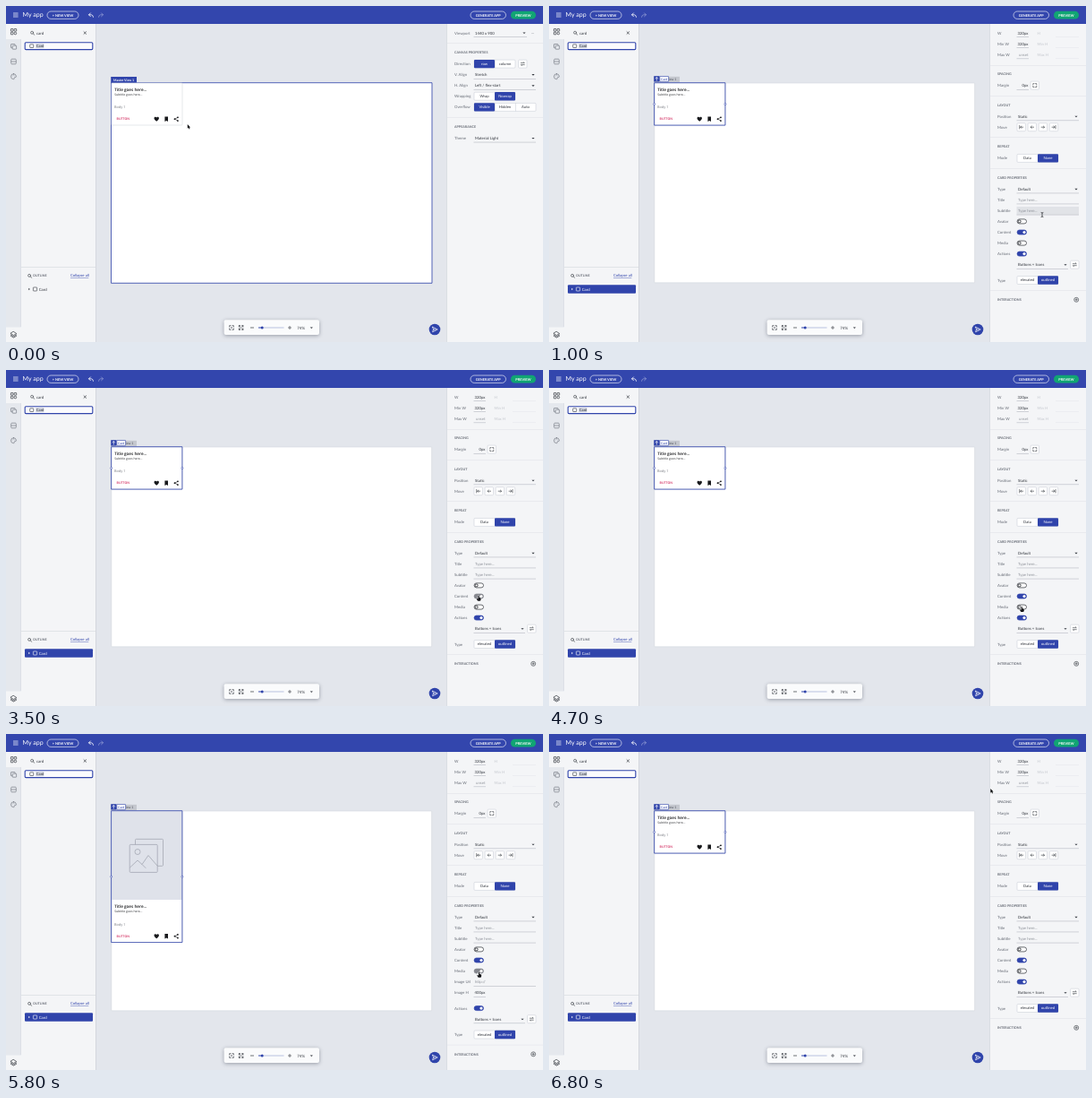
An HTML page with a canvas for the animation above (7 s loop, 600 by 375 pixels).

```html
<!DOCTYPE html>
<html lang="en">
<head>
<meta charset="utf-8">
<title>App builder</title>
<style>
html, body { margin: 0; width: 100%; height: 100%; overflow: hidden; background: #e3e6ec; }
canvas { display: block; width: 600px; height: 375px; }
</style>
</head>
<body>
<canvas id="stage"></canvas>
<script>
const LOOP = 7000, STEP = 100;
const BLUE = '#3044ab', HEAD = '#3346ad', INK = '#30343c', GREY = '#666b75', LINE = '#a9adb6', RULE = '#dcdfe5', PANEL = '#f4f5f7';
const UI = 'Lato, "Open Sans", sans-serif', CARD = '"Open Sans", "Noto Sans", sans-serif';
const cv = document.getElementById('stage'), c = cv.getContext('2d');
const dpr = window.devicePixelRatio || 1;
cv.width = 600 * dpr;
cv.height = 375 * dpr;

function text(s, x, y, size = 4.3, color = INK, weight = 400, align = 'left', font = UI) {
  c.font = `${weight} ${size}px ${font}`;
  c.fillStyle = color;
  c.textAlign = align;
  c.fillText(s, x, y + size * 0.35);
}
function rect(x, y, w, h, color) {
  c.fillStyle = color;
  c.fillRect(x, y, w, h);
}
function box(x, y, w, h, r, fill, stroke, lw = 0.5) {
  c.beginPath();
  c.roundRect(x, y, w, h, r);
  paint(fill, stroke, lw);
}
function disc(x, y, r, fill, stroke, lw = 0.5) {
  c.beginPath();
  c.arc(x, y, r, 0, 7);
  paint(fill, stroke, lw);
}
function paint(fill, stroke, lw) {
  if (fill) { c.fillStyle = fill; c.fill(); }
  if (stroke) { c.strokeStyle = stroke; c.lineWidth = lw; c.stroke(); }
}
// SVG path placed with its own origin at x, y
function icon(d, x, y, fill, stroke, lw = 0.6) {
  const p = new Path2D(d);
  c.save();
  c.translate(x, y);
  c.lineJoin = c.lineCap = 'round';
  if (stroke) { c.strokeStyle = stroke; c.lineWidth = lw; c.stroke(p); }
  if (fill) { c.fillStyle = fill; c.fill(p); }
  c.restore();
}
const caret = (x, y) => icon('M-1.6-.7H1.6L0 .9Z', x, y, INK);
const plus = (x, y, r, color) => icon(`M${-r} 0H${r}M0 ${-r}V${r}`, x, y, null, color);
const rule = y => rect(493, y, 107, 0.5, RULE);
const heading = (s, y) => text(s, 501, y, 3.7, GREY, 700);
const label = (s, y) => text(s, 501, y, 4.3, GREY);
const glass = (x, y) => icon('M1 0A1.5 1.5 0 1 1-2 0A1.5 1.5 0 1 1 1 0M.6 1.1L2.2 2.5', x, y, null, INK);

function field(s, y, x1 = 592, color = INK) {
  text(s, 524, y, 4.3, color);
  rect(522.5, y + 4.4, x1 - 522.5, 0.5, LINE);
}
function select(name, s, y, x1 = 592) {
  if (name) label(name, y);
  field(s, y, x1);
  caret(x1 - 3, y + 0.2);
}
function number(name, s, y, color = INK) {
  label(name, y);
  text(s, 535.5, y, 4.3, color, 400, 'right');
  rect(522.5, y + 4.4, 13.5, 0.5, LINE);
}
function segments(name, items, on, y) {
  label(name, y);
  box(523, y - 4.5, 23 * items.length, 9, 1, '#fff', '#c3c7d0');
  items.forEach((s, i) => {
    const x = 523 + 23 * i;
    if (i === on) box(x, y - 4.7, 23, 9.4, 1, BLUE);
    else if (i) rect(x, y - 4.5, 0.5, 9, '#c3c7d0');
    text(s, x + 11.5, y, 4.2, i === on ? '#fff' : INK, 400, 'center');
  });
}
function square(x, y) { box(x - 4.7, y - 4.5, 9.4, 9, 1, '#fff', '#c3c7d0'); }
function swap(x, y) {
  square(x, y);
  icon('M-2-1H2L1-2M2 1H-2L-1 2', x, y, null, INK);
}
function toggle(name, y, state) {
  label(name, y);
  const on = state !== 'off', fill = { on: BLUE, hover: '#5059d2', wait: '#85878e', off: '#fff' }[state];
  box(523.1, y - 2.5, 10.4, 5, 2.5, fill, on ? fill : '#2d3036', 0.7);
  if (on) disc(531, y, 1.6, '#fff');
  else disc(525.7, y, 1.5, '#fff', '#2d3036', 0.9);
}

function header() {
  rect(0, 0, 600, 20, HEAD);
  icon('M-2.4-2H2.4M-2.4 0H2.4M-2.4 2H2.4', 10.8, 10, null, '#fff', 0.7);
  text('My app', 18.6, 10, 7, '#fff');
  box(46, 6, 35, 8.4, 4.2, null, '#fff', 0.6);
  text('+ NEW VIEW', 63.5, 10.2, 3.9, '#fff', 700, 'center');
  const undo = 'M-.6-2.4L-2.5-.5L-.6 1.4M-2.4-.5H.4Q2.2-.3 2.5 2';
  icon(undo, 95, 10.3, null, '#fff', 0.8);
  c.save();
  c.translate(106, 10.3);
  c.scale(-1, 1);
  icon(undo, 0, 0, null, '#8d99d3', 0.8);
  c.restore();
  box(519, 6, 39.5, 8.4, 4.2, null, '#fff', 0.6);
  text('GENERATE APP', 538.7, 10.2, 3.9, '#fff', 700, 'center');
  box(564, 5.8, 28, 8.8, 4.4, '#11a573');
  text('PREVIEW', 578, 10.2, 3.9, '#fff', 700, 'center');
}

function leftSide(picked) {
  rect(0, 20, 17, 355, '#e5e8ed');
  rect(0, 20, 17, 17, PANEL);
  rect(0, 358.5, 17, 16.5, PANEL);
  rect(17, 20, 83, 355, PANEL);
  rect(16.5, 37, 0.5, 321, '#d3d7de');
  rect(100, 20, 0.6, 355, '#cfd3db');
  for (const [x, y] of [[5.4, 25.5], [9.1, 25.5], [5.4, 29.2]]) box(x, y, 2.6, 2.6, 0.3, null, INK, 0.7);
  disc(10.4, 30.5, 1.3, null, INK, 0.7);
  box(5.5, 42.5, 4.6, 4.2, 0.5, null, GREY, 0.6);
  box(7.2, 44.2, 4.4, 4, 0.5, '#e5e8ed', GREY, 0.6);
  box(5.7, 59.2, 5.6, 5.6, 1, null, GREY, 0.6);
  rect(5.7, 61.7, 5.6, 0.6, GREY);
  icon('M0-3A3 3 0 1 0 0 3Q1 3 .6 1.9Q.4 1 1.6 1Q3 1 3-.3Q2.6-3 0-3Z', 8.5, 78.7, null, GREY);
  for (const [x, y] of [[7, 78], [8.4, 77], [10, 78]]) disc(x, y, 0.4, GREY);
  icon('M0-3L3.2-1L0 1L-3.2-1ZM-3.2 .4L0 2.3L3.2 .4M-3.2 1.7L0 3.6L3.2 1.7', 8.5, 366.5, null, INK, 0.7);

  glass(29.6, 29.7);
  text('card', 34, 30, 4.3);
  icon('M-1.3-1.3L1.3 1.3M1.3-1.3L-1.3 1.3', 88.3, 30, null, INK, 0.7);
  box(21.2, 40.8, 75.6, 7.8, 1, '#fbfbfd', BLUE, 1.1);
  box(26.7, 42.8, 4, 3.7, 0.5, null, INK, 0.6);
  rect(33.3, 42.2, 9, 5, '#cfd2dc');
  text('Card', 33.8, 44.8, 4.2);

  rect(17, 291.3, 83, 0.6, '#d3d7de');
  glass(26.6, 300.8);
  text('OUTLINE', 30, 301.2, 3.6, GREY, 700);
  text('Collapse all', 72, 301, 4.2, BLUE);
  rect(72, 303.2, 20.3, 0.4, BLUE);
  const ink = picked ? '#fff' : INK;
  if (picked) box(21, 311.3, 76, 9.4, 1, BLUE);
  icon('M-.7-1.3L.8 0L-.7 1.3Z', 26, 316, ink);
  box(30.4, 314, 4.2, 4, 0.5, null, ink, 0.6);
  text('Card', 36.7, 316.2, 4.3, ink);
}

function media() {
  rect(118, 86, 79, 99, '#dfe2ea');
  c.lineJoin = 'round';
  const stroke = '#a4a8b3';
  box(144.5, 117.3, 31, 30, 1, null, stroke, 0.8);
  box(138.2, 123.4, 31, 31, 1, '#dfe2ea', stroke, 0.8);
  disc(147, 131.5, 3, null, stroke, 0.8);
  icon('M138.5 149L147 141L152 145.5L159 135.5L169 147M152 145.5L156 149.5', 0, 0, null, stroke, 0.8);
}

function card(s) {
  const dy = s.media ? 99.5 : 0, up = s.content ? 0 : -14, h = 47 + dy + up;
  box(118, 86, 79, h, 0.8, '#fff', '#d5d8de', 0.6);
  if (s.media) media();
  const x = s.avatar ? 135.2 : 121.2;
  if (s.avatar) {
    disc(126.4, 94.6 + dy, 5, '#bfc2c8');
    disc(126.4, 93.1 + dy, 1.5, '#454951');
    icon('M-2.8 2.8Q-2.7 .5 0 .5Q2.7 .5 2.8 2.8Z', 126.4, 94.8 + dy, '#454951');
  }
  text('Title goes here...', x, 92.9 + dy, 4.6, '#17181b', 600, 'left', CARD);
  text('Subtitle goes here...', x, 98.7 + dy, 3.4, '#25272b', 400, 'left', CARD);
  if (s.content) text('Body 1', 121, 112.7 + dy, 3.9, '#777a80', 400, 'left', CARD);
  const y = 126.2 + dy + up;
  text('BUTTON', 123.6, y, 3.5, '#d0245a', 600, 'left', CARD);
  icon('M0 2.5C-2 .9-2.7 0-2.7-1C-2.7-2.6-.8-3 0-1.6C.8-3 2.7-2.6 2.7-1C2.7 0 2 .9 0 2.5Z', 168.2, y, '#18191c');
  icon('M-1.8-2.6H1.8V2.7L0 1.8L-1.8 2.7Z', 179.2, y, '#18191c');
  icon('M1.7-1.8L-1.7 0L1.7 1.8', 190.2, y, null, '#18191c', 0.6);
  for (const [a, b] of [[1.7, -1.9], [-1.7, 0], [1.7, 1.9]]) disc(190.2 + a, y + b, 0.9, '#18191c');
  if (s.picked) {
    box(117.6, 85.7, 79.3, h + 0.4, 0, null, BLUE, 0.8);
    for (const hx of [117.6, 196.9]) disc(hx, 86 + h / 2, 1, '#fff', BLUE, 0.6);
  } else if (s.over) box(117.8, 86, 79.2, h, 0, null, BLUE, 0.6);
}

function board(s) {
  rect(100.6, 20, 392, 355, '#e3e6ec');
  rect(117.8, 86, 357.8, 222.8, '#fff');
  if (!s.picked) {
    box(117.5, 85.7, 358.5, 223.6, 0, null, BLUE, 0.8);
    rect(117.2, 79, 28.8, 6.8, BLUE);
    text('Master View 1', 131.6, 82.4, 3.6, '#fff', 700, 'center');
  } else {
    box(117.8, 86, 357.8, 222.8, 0, null, '#cfd3da', 0.5);
    rect(117.4, 78.8, 28.6, 6.5, '#c4c7ce');
    text('Master View 1', 131, 82.1, 3.6, '#50545d', 400, 'center');
  }
  card(s);
  if (s.picked) {
    rect(117.2, 78.2, 6.3, 6.3, BLUE);
    icon('M0 1.8V-1.6M-1.3-.4L0-1.7L1.3-.4', 120.3, 81.3, null, '#fff', 0.7);
    box(123.8, 78.5, 9.8, 5.8, 0.4, '#fff', BLUE, 0.6);
    text('Card', 128.7, 81.4, 3.5, BLUE, 400, 'center');
  }
}

function zoomBar() {
  c.save();
  c.shadowColor = 'rgba(40,46,62,.4)';
  c.shadowBlur = 4 * dpr;
  c.shadowOffsetY = dpr;
  box(243.6, 350.2, 106.4, 16.8, 2, '#fafbfc');
  c.restore();
  const corners = 'M-2.3-1V-2.3H-1M1-2.3H2.3V-1M2.3 1V2.3H1M-1 2.3H-2.3V1';
  icon(corners, 252, 359, null, INK, 0.7);
  disc(252, 359, 0.7, INK);
  icon(corners + 'M-2.2-2.2L-.7-.7M2.2-2.2L.7-.7M2.2 2.2L.7 .7M-2.2 2.2L-.7 .7', 262.6, 359, null, INK, 0.7);
  icon('M-1.6 0H1.6', 275, 359, null, INK, 0.7);
  rect(282, 358.6, 28.5, 0.8, '#a9b1d8');
  rect(282, 358.6, 4, 0.8, BLUE);
  disc(286.2, 359, 1.5, BLUE);
  plus(317, 359, 1.6, INK);
  text('74%', 325.3, 359.1, 4.4);
  caret(341.3, 359.2);
  disc(479, 361, 6.3, BLUE);
  icon('M-2.4-2.8L3.2 0L-2.4 2.8L-1.5 0ZM-1.5 0H1', 479, 361, null, '#fff', 0.7);
}

function viewProps() {
  select('Viewport', '1440 x 900', 30, 582);
  text('...', 588.5, 29, 4.5, GREY, 400, 'center');
  rule(41.5);
  heading('CANVAS PROPERTIES', 52);
  segments('Direction', ['row', 'column'], 0, 64.6);
  swap(577.3, 64.6);
  select('V. Align', 'Stretch', 76.6);
  select('H. Align', 'Left / flex-start', 88.8);
  segments('Wrapping', ['Wrap', 'Nowrap'], 1, 100.7);
  segments('Overflow', ['Visible', 'Hidden', 'Auto'], 0, 112.9);
  rule(124);
  heading('APPEARANCE', 134.8);
  select('Theme', 'Material Light', 147.4);
}

function cardProps(s) {
  const faint = '#c3c6cd';
  [['W', '320px', 'H'], ['Min W', '320px', 'Min H'], ['Max W', 'unset', 'Max H']].forEach(([a, v, b], i) => {
    const y = 30 + 12.1 * i;
    number(a, v, y, i === 2 ? '#92969e' : INK);
    text(b, 545.5, y, 4.3, faint);
    rect(566, y + 4.4, 26, 0.4, '#dfe1e6');
  });
  rule(66.2);
  heading('SPACING', 76.2);
  number('Margin', '0px', 88.6);
  square(542.8, 88.6);
  icon('M-2-.7V-2H-.7M.7-2H2V-.7M2 .7V2H.7M-.7 2H-2V.7', 542.8, 88.6, null, INK, 0.6);
  rule(100.3);
  heading('LAYOUT', 110.9);
  select('Position', 'Static', 123.2);
  label('Move', 135.2);
  ['M-2-1.8V1.8M2 0H-1M.2-1.2L-1 0L.2 1.2', 'M1.8 0H-1.6M-.4-1.2L-1.6 0L-.4 1.2',
   'M-1.8 0H1.6M.4-1.2L1.6 0L.4 1.2', 'M2-1.8V1.8M-2 0H1M-.2-1.2L1 0L-.2 1.2'].forEach((d, i) => {
    const x = 527.7 + 12.1 * i;
    square(x, 135.2);
    icon(d, x, 135.2, null, INK, 0.6);
  });
  rule(146.5);
  heading('REPEAT', 157);
  segments('Mode', ['Data', 'None'], 1, 169.9);
  rule(181);
  heading('CARD PROPERTIES', 191.5);
  select('Type', 'Default', 204.3);
  label('Title', 216.3);
  field('Type here...', 216.3, 592, '#8d9199');
  if (s.overField) rect(522.5, 223.9, 69.5, 9, '#e1e3e7');
  label('Subtitle', 228.4);
  field('Type here...', 228.4, 592, '#8d9199');
  toggle('Avatar', 240.4, s.avatarKey);
  toggle('Content', 252.5, s.contentKey);
  toggle('Media', 264.6, s.mediaKey);
  if (s.media) {
    label('Image Url', 276.6);
    field('http://', 276.6, 592, '#8d9199');
    number('Image H', '400px', 288.7);
  }
  const dy = s.media ? 29.5 : 0;
  toggle('Actions', 276.6 + dy, 'on');
  select('', 'Buttons + Icons', 288.7 + dy, 580);
  swap(587.3, 288.7 + dy);
  segments('Type', ['elevated', 'outlined'], 1, 306 + dy);
  rule(317.3 + dy);
  heading('INTERACTIONS', 327.8 + dy);
  disc(589.2, 327.8 + dy, 2.5, null, INK, 0.6);
  plus(589.2, 327.8 + dy, 1.2, INK);
}

// time, x, y of the pointer tip
const PATH = [
  [0, 202.8, 132], [200, 187, 112], [800, 187, 112], [1000, 551, 233], [1100, 547, 237], [1200, 547, 237],
  [1500, 528, 241], [2600, 528, 241], [2800, 528, 252], [4400, 528, 252], [4700, 528.2, 264.2],
  [5700, 528.2, 264.2], [5800, 528.6, 266], [6300, 528.6, 266], [6800, 493.3, 61], [LOOP, 493.3, 61]
];
function pointer(t) {
  const i = PATH.findIndex(p => p[0] > t), [t0, x0, y0] = PATH[i - 1], [t1, x1, y1] = PATH[i];
  const k = (t - t0) / (t1 - t0), e = k * k * (3 - 2 * k);
  const x = x0 + (x1 - x0) * e, y = y0 + (y1 - y0) * e;
  if (t >= 1000 && t < 1300) {
    icon('M-1-2.6Q0-2.6 0-1.8V1.8Q0 2.6-1 2.6M1-2.6Q0-2.6 0-1.8M0 1.8Q0 2.6 1 2.6', x, y, null, '#24262b', 0.7);
  } else if (t >= 1400 && t < 6400) {
    icon('M-.6 0Q0-.6 .6 0V2Q1.3 1.7 1.7 2.3Q2.4 2.1 2.6 2.8V4.2L2 5.8H-.9L-2.4 3.4Q-1.8 2.5-.6 3.5Z', x, y, '#15161a', '#fff', 0.9);
  } else {
    icon('M0 0V4.7L1.1 3.7L1.9 5.4L2.7 5L1.9 3.4H3.3Z', x, y, '#0c0d0f', '#fff', 0.8);
  }
}

function stateAt(t) {
  const during = (a, b) => t >= a && t < b;
  const s = {
    over: during(100, 600),
    picked: t >= 600,
    overField: during(1000, 1100),
    avatar: during(1700, 2600),
    content: !during(3600, 4100),
    media: during(5500, 6000)
  };
  s.avatarKey = s.avatar ? 'hover' : 'off';
  s.contentKey = during(3500, 3600) || during(4000, 4100) ? 'wait' : s.content ? 'on' : 'off';
  s.mediaKey = during(5300, 5500) || during(5800, 6000) ? 'wait' : s.media ? 'hover' : 'off';
  return s;
}

function draw(t) {
  const s = stateAt(t);
  c.setTransform(dpr, 0, 0, dpr, 0, 0);
  c.textRendering = 'geometricPrecision';
  board(s);
  leftSide(s.picked);
  rect(492.5, 20, 107.5, 355, PANEL);
  rect(492.3, 20, 0.6, 355, '#cfd3db');
  if (s.picked) cardProps(s);
  else viewProps();
  zoomBar();
  header();
  pointer(t);
}

const start = performance.now();
function tick() {
  const t = (performance.now() - start) % LOOP;
  draw(Math.floor(t / STEP) * STEP);
  requestAnimationFrame(tick);
}
tick();
</script>
</body>
</html>
```
